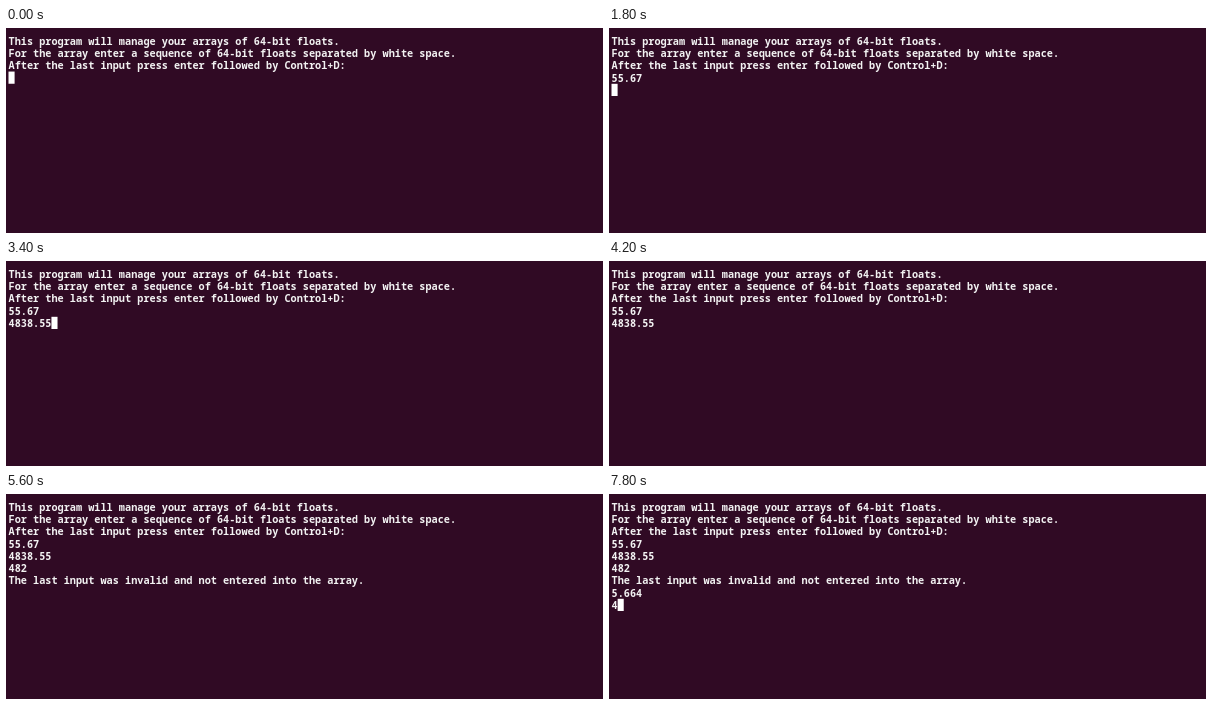
An HTML page for the animation above (8000 ms loop, 597x205 px).

```html
<!DOCTYPE html>
<html lang="en">
<head>
<meta charset="utf-8">
<style>
  html, body { margin: 0; width: 100%; height: 100%; overflow: hidden; background: #300a24; }
  svg { display: block; }
  text { font: 600 10.22px "Noto Sans Mono", "DejaVu Sans Mono", monospace; fill: #f2f2f2; white-space: pre; font-variant-ligatures: none; }
</style>
</head>
<body>
<svg id="term" width="597" height="205" viewBox="0 0 597 205">
  <rect width="597" height="205" fill="#300a24"/>
  <rect id="cursor" width="6.1" height="12.2" fill="#fff"/>
</svg>
<script>
const LOOP = 8000, LEFT = 2.5, TOP = 6.8, CELL = 6.132, PITCH = 12.25, BASE = 10.1;

const INTRO = [
  'This program will manage your arrays of 64-bit floats.',
  'For the array enter a sequence of 64-bit floats separated by white space.',
  'After the last input press enter followed by Control+D:',
  ''
].join('\n');
const ERROR = '\nThe last input was invalid and not entered into the array.\n';

// [time in ms, output]
const EVENTS = [
  [200, '5'], [400, '5'], [600, '.'], [800, '6'], [1200, '7'], [1700, '\n'],
  [2100, '4'], [2300, '8'], [2400, '3'], [2600, '8'],
  [3100, '.'], [3200, '5'], [3400, '5'], [3600, '\n'],
  [4300, '4'], [4500, '8'], [4700, '2'], [5000, ERROR],
  [6200, '5'], [6400, '.'], [6500, '6'], [6800, '6'], [7000, '4'], [7400, '\n'],
  [7800, '4']
];
const BLINKS = [[4200, 4300], [5600, 6200]];

const svg = document.getElementById('term');
const cursor = document.getElementById('cursor');
const rows = Array.from({ length: 9 }, (_, i) => {
  const row = document.createElementNS(svg.namespaceURI, 'text');
  row.setAttribute('x', LEFT);
  row.setAttribute('y', TOP + i * PITCH + BASE);
  return svg.appendChild(row);
});

function draw(t) {
  const typed = EVENTS.filter(([at]) => at <= t).map(([, out]) => out).join('');
  const lines = (INTRO + typed).split('\n');
  rows.forEach((row, i) => {
    const line = lines[i] || '';
    if (row.textContent !== line) row.textContent = line;
  });
  const last = lines.length - 1;
  cursor.setAttribute('x', LEFT + lines[last].length * CELL);
  cursor.setAttribute('y', TOP + last * PITCH);
  const hidden = BLINKS.some(([from, to]) => t >= from && t < to);
  cursor.setAttribute('visibility', hidden ? 'hidden' : 'visible');
}

const start = performance.now();
function tick() {
  draw((performance.now() - start) % LOOP);
  requestAnimationFrame(tick);
}
tick();
</script>
</body>
</html>
```
